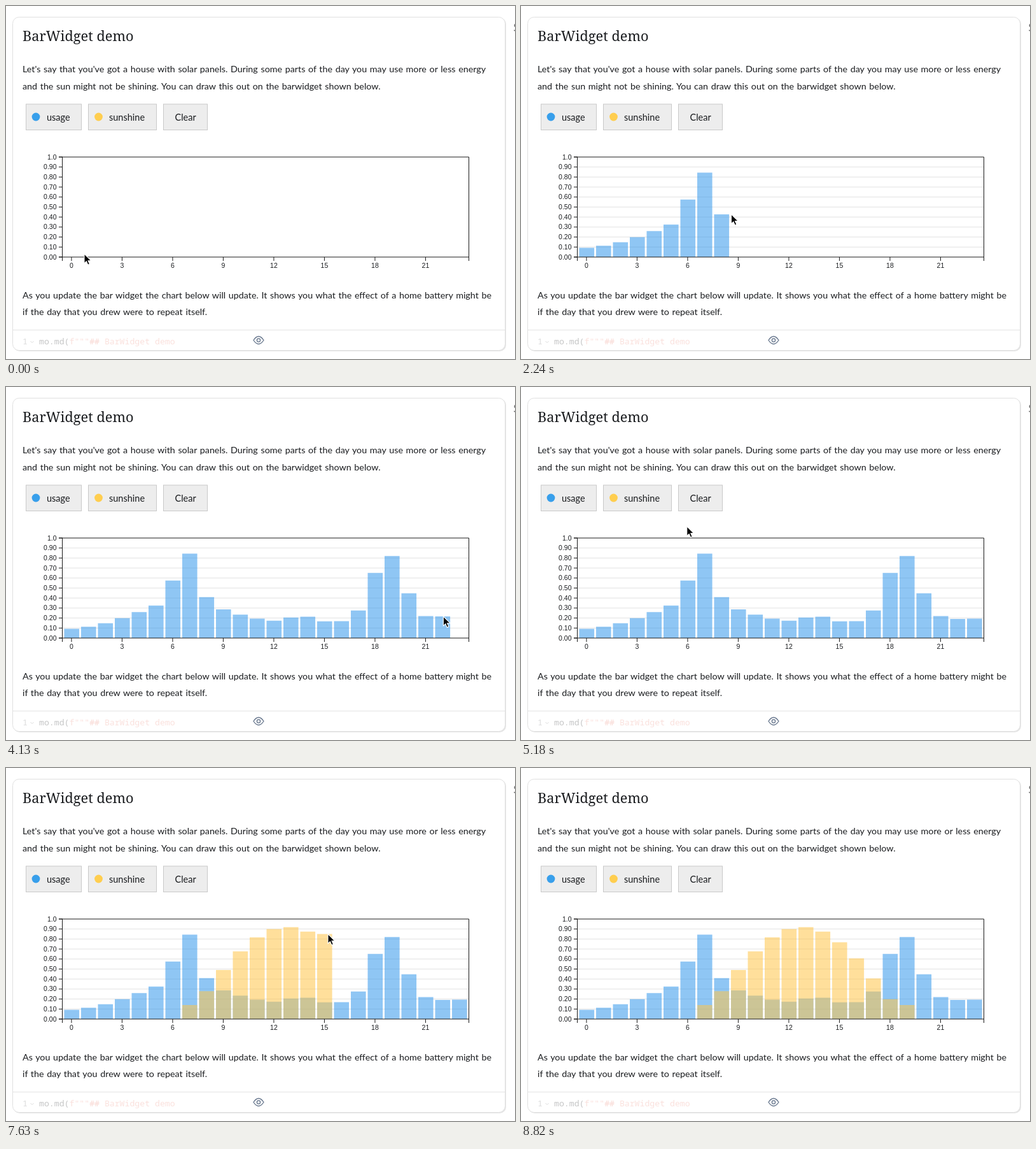
Write an HTML page that moves like this. It is 800 by 554 pixels and loops after 8.89 s.

```html
<!DOCTYPE html>
<html lang="en">
<head>
<meta charset="utf-8">
<title>BarWidget demo</title>
<style>
  html, body { margin: 0; width: 100%; height: 100%; overflow: hidden; background: #fff; }
  svg { display: block; }
  text { fill: #1a1c1f; }
  .title { font: 21.75px "Noto Serif", serif; }
  .body { font: 14.3px Lato, sans-serif; word-spacing: 1px; }
  .body .label { font-size: 14.5px; }
  .axis text { font: 10.5px "Liberation Sans", Arial, sans-serif; }
  .code { font: 13.2px "Noto Sans Mono", monospace; }
  .code .string { fill: #ec8878; }
  .button { fill: #ededed; stroke: #c9c9c9; }
  .line { fill: none; stroke: #1a1a1a; }
</style>
</head>
<body>
<svg width="800" height="554" viewBox="0 0 800 554">
  <rect x="11.5" y="18.5" width="774.5" height="523.5" rx="10" fill="#e6e6e6"/>
  <rect x="10.5" y="17.5" width="774" height="523" rx="10" fill="#fff" stroke="#e0e0e0"/>
  <path d="M11 508.5H784" stroke="#e4e4e4"/>
  <text x="797.5" y="40" font-family="Lato, sans-serif" font-size="18" style="fill:#666">S</text>

  <g id="output">
    <text class="title" x="26" y="55">BarWidget demo</text>
    <g class="body">
      <text x="26" y="104">Let's say that you've got a house with solar panels. During some parts of the day you may use more or less energy</text>
      <text x="26" y="131">and the sun might not be shining. You can draw this out on the barwidget shown below.</text>
      <text x="26" y="459">As you update the bar widget the chart below will update. It shows you what the effect of a home battery might be</text>
      <text x="26" y="485">if the day that you drew were to repeat itself.</text>
      <rect class="button" x="31.5" y="154" width="87" height="40.5"/>
      <rect class="button" x="129.5" y="154" width="107" height="40.5"/>
      <rect class="button" x="247.5" y="154" width="69" height="40.5"/>
      <circle cx="47" cy="174" r="6.4" fill="#389feb"/>
      <circle cx="145.5" cy="174" r="6.4" fill="#ffce4f"/>
      <text class="label" x="64" y="180">usage</text>
      <text class="label" x="162" y="180">sunshine</text>
      <text class="label" x="265.5" y="180">Clear</text>
    </g>
    <path id="grid" stroke="#e2e2e2"/>
    <path id="usage" fill="#3498eb" fill-opacity=".55"/>
    <path id="sunshine" fill="#ffc549" fill-opacity=".55"/>
    <g id="axis" class="axis"><path id="frame" class="line"/></g>
  </g>

  <g id="code" class="code">
    <g opacity=".6">
      <text x="26" y="531">1</text>
      <path d="M38.5 526l2.5 2.5 2.5-2.5" class="line"/>
    </g>
    <text x="52" y="531">mo.md(<tspan class="string">f"""<tspan font-weight="bold">##</tspan> BarWidget demo</tspan></text>
  </g>
  <g fill="none" stroke="#64748b" stroke-width="1.3">
    <path d="M389 524.5Q397 512.5 405 524.5Q397 536.5 389 524.5Z"/>
    <circle cx="397" cy="524.5" r="2.6"/>
  </g>
  <path id="cursor" d="M0 0V14.8L3.4 11.7L5.8 17.2L8.4 16.1L6.1 10.7H10.8Z" stroke="#fff" stroke-width="1.1"/>
</svg>
<script>
const LOOP = 8890, LEFT = 89.7, STEP = 26.5, BASE = 394, HEIGHT = 157;
const $ = id => document.getElementById(id);
const toX = hour => LEFT + hour * STEP;
const toY = value => BASE - HEIGHT * value;
const mix = (a, b, k) => a + (b - a) * k;

const bump = (hour, center, height, spread) => height * Math.exp(-((hour - center) ** 2) / spread);

// Slow rise over the day, with morning, midday and evening humps.
const usageAt = hour => 0.08 + 0.005 * hour + bump(hour, 6.5, 0.25, 14) +
  bump(hour, 6.8, 0.51, 0.76) + bump(hour, 13.6, 0.07, 1) + bump(hour, 18.75, 0.67, 1.7);

const sunshineAt = hour => 0.14 + 0.78 * Math.max(0, 1 - ((hour - 12.8) / 5.6) ** 2) ** 1.3;

// A steady drag across the chart: each bar keeps the level at which the pointer left it.
function makeDrag(id, valueAt, start, end, fromHour, toHour) {
  const first = Math.floor(fromHour);
  const point = t => {
    const hour = mix(fromHour, toHour, (t - start) / (end - start));
    const bar = Math.floor(hour - 0.1), k = hour - 0.1 - bar;
    const level = mix(valueAt(Math.max(bar - 1, first)), valueAt(Math.max(bar, first)), k ** 3);
    return { bar, level, x: toX(hour), y: toY(level) };
  };
  const draw = t => {
    const { bar, level } = point(Math.min(t, end));
    let d = "";
    for (let i = first; t >= start && i <= bar; i++) {
      const y = toY(i === bar && t < end ? level : valueAt(i));
      d += `M${toX(i) + 1.8} ${BASE}V${y}h23.6V${BASE}Z`;
    }
    $(id).setAttribute("d", d);
  };
  const stop = t => [t, point(t).x, point(t).y];
  return { start, end, point, draw, stops: [stop(start), stop(end)] };
}

const usage = makeDrag("usage", usageAt, 1036, 4306, 0.5, 23.8);
const sunshine = makeDrag("sunshine", sunshineAt, 6600, 8151, 7.6, 19.8);

// Pointer stops as [time, x, y]: chart, sunshine button, chart, then off the stage.
const path = [
  [0, 123, 389], ...usage.stops, [5180, 261, 219], [5500, 186, 178], [5950, 186, 178],
  [6440, 307, 368], ...sunshine.stops, [8500, 650, 575], [LOOP, 650, 575]
];

function pointerAt(t) {
  const drag = [usage, sunshine].find(d => t >= d.start && t <= d.end);
  if (drag) return drag.point(t);
  const i = path.findIndex(stop => stop[0] > t), [t0, x0, y0] = path[i - 1], [t1, x1, y1] = path[i];
  const k = (t - t0) / (t1 - t0);
  return { x: mix(x0, x1, k), y: mix(y0, y1, k) };
}

function buildAxes() {
  let frame = `M83 237H727.5V400M83 ${BASE}H727.5M88.5 237V400`, grid = "";
  const label = (x, y, anchor, text) => $("axis").insertAdjacentHTML("beforeend",
    `<text x="${x}" y="${y}" text-anchor="${anchor}">${text}</text>`);
  for (let i = 0; i <= 10; i++) {
    const y = toY(i / 10);
    frame += `M83 ${y}h6`;
    if (i % 10) grid += `M89 ${y}H727`;
    label(79.5, y + 3.5, "end", i < 10 ? (i / 10).toFixed(2) : "1.0");
  }
  for (let hour = 0; hour < 24; hour += 3) {
    const x = toX(hour + 0.5);
    frame += `M${x} ${BASE}v6`;
    label(x, 411, "middle", hour);
  }
  $("frame").setAttribute("d", frame);
  $("grid").setAttribute("d", grid);
}

function render(now) {
  const t = now % LOOP, running = t >= 1350 && t < 1960;
  usage.draw(t);
  sunshine.draw(t);
  const { x, y } = pointerAt(t);
  $("cursor").setAttribute("transform", `translate(${x} ${y})`);
  $("output").setAttribute("opacity", running ? 0.25 : 1);
  $("code").setAttribute("opacity", running ? 0.45 : 0.25);
  $("grid").setAttribute("visibility", t < 1960 ? "hidden" : "visible");
  requestAnimationFrame(render);
}

buildAxes();
render(0);
</script>
</body>
</html>
```
